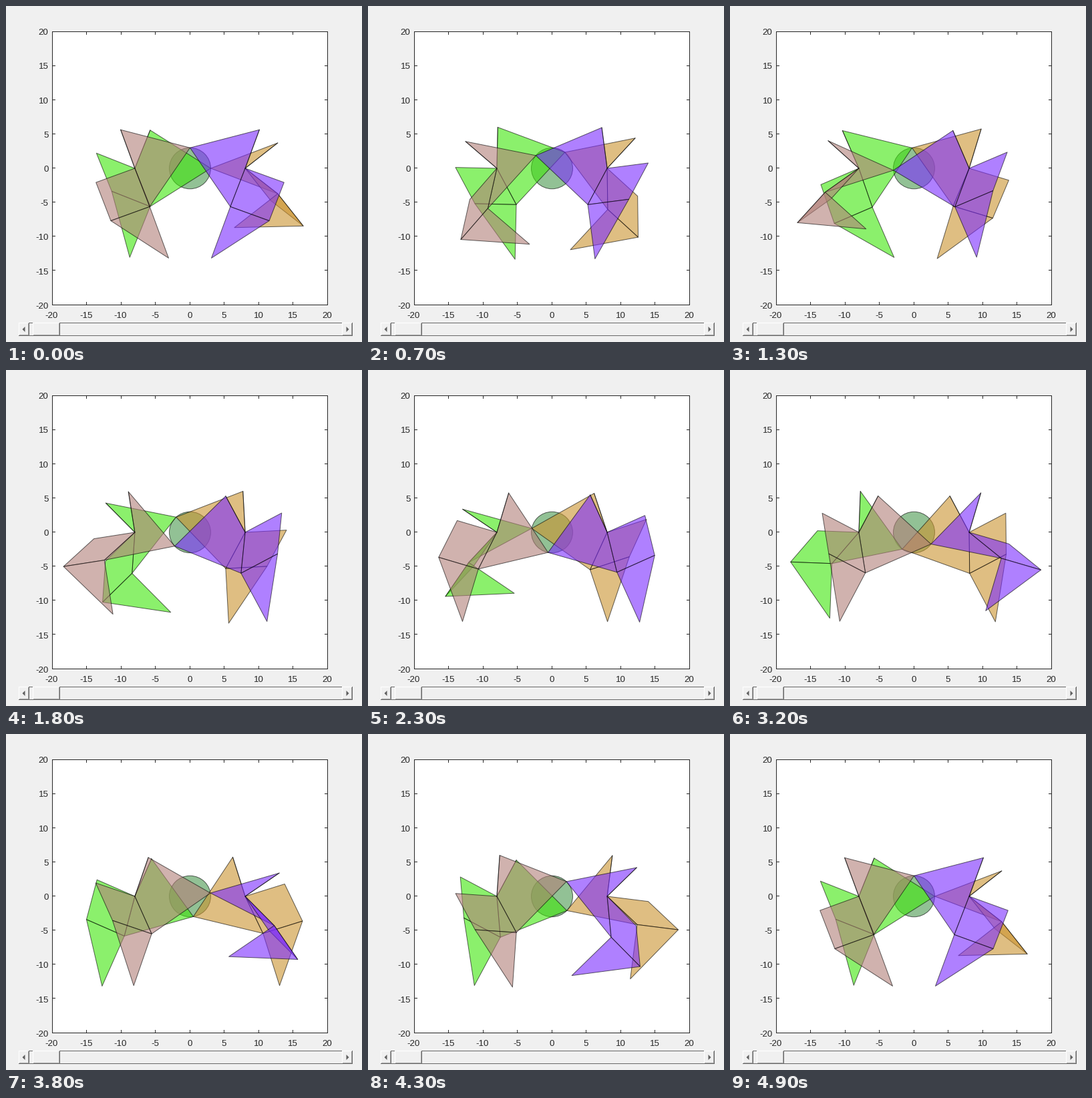
Animation of 533 by 503 pixels, one loop 5 s. Source, as a matplotlib script:

```python
import numpy as np
import matplotlib.pyplot as plt
from matplotlib.animation import FuncAnimation
from matplotlib.patches import Circle, Polygon, Rectangle

W, H, DPI = 533, 503, 100
PX = 72 / DPI                      # one pixel in points
FRAMES, INTERVAL = 50, 100
CRANK, PIVOT, BAR, ROD, SHIN = 3, 8, 6, 10.4, 8
ALPHA = 0.6
INK = "#262626"
LINE = (0, 0, 0, ALPHA)
EDGE = dict(edgecolor=LINE, linewidth=PX, joinstyle="round", zorder=1)
LEFT, RIGHT, TOP, BOTTOM = 69, 482, 38, 448

plt.rcParams["font.family"] = "Liberation Sans"
fig = plt.figure(figsize=(W / DPI, H / DPI), dpi=DPI, facecolor="#f0f0f0")

# Pixel-space layer for the frame, the labels and the scroll bar
ui = fig.add_axes([0, 0, 1, 1], zorder=-1)
ui.set(xlim=(0, W), ylim=(H, 0))
ui.axis("off")

ax = fig.add_axes([LEFT / W, 1 - BOTTOM / H, (RIGHT - LEFT) / W, (BOTTOM - TOP) / H])
ax.set(xlim=(-20, 20), ylim=(-20, 20))
ax.axis("off")


def box(x0, y0, x1, y1, color):
    ui.add_patch(Rectangle((x0, y0), x1 - x0, y1 - y0, color=color,
                           linewidth=0, antialiased=False))


def label(x, y, value, align):
    ui.text(x, y, str(value), ha=align, va="baseline", color=INK, fontsize=13.33 * PX)


def raised(x0, y0, x1, y1):
    box(x0, y0, x1, y1, "#696969")
    box(x0, y0, x1 - 1, y1 - 1, "#ffffff")
    box(x0 + 1, y0 + 1, x1 - 1, y1 - 1, "#a0a0a0")
    box(x0 + 1, y0 + 1, x1 - 2, y1 - 2, "#f0f0f0")


def arrow(x, y, direction):
    ui.add_patch(Polygon([(x - 2 * direction, y - 4), (x - 2 * direction, y + 4),
                          (x + 2 * direction, y)], color="#606060", linewidth=0))


# Plot frame with inward ticks on all four sides
box(LEFT, TOP, RIGHT, BOTTOM, INK)
box(LEFT + 1, TOP + 1, RIGHT - 1, BOTTOM - 1, "white")
for v in range(-20, 21, 5):
    share = (v + 20) / 40
    x = int(LEFT + share * (RIGHT - LEFT - 1))
    y = int(BOTTOM - 1 - share * (BOTTOM - TOP - 1))
    box(x, TOP, x + 1, TOP + 5, INK)
    box(x, BOTTOM - 5, x + 1, BOTTOM, INK)
    box(LEFT, y, LEFT + 5, y + 1, INK)
    box(RIGHT - 5, y, RIGHT, y + 1, INK)
    label(LEFT - 0.8 + share * (RIGHT - LEFT), 467, v, "center")
    label(63.5, BOTTOM + 5 - share * (BOTTOM - TOP), v, "right")

# Scroll bar
box(35, 474, 504, 494, "#696969")
box(35, 475, 503, 493, "#f0f0f0")
raised(19, 474, 35, 494)
raised(503, 474, 519, 494)
raised(40, 474, 81, 494)
arrow(26.5, 484, -1)
arrow(511.5, 484, 1)


def tint(rgb):
    return tuple(c / 255 for c in rgb) + (ALPHA,)


class Leg:
    """Linkage on one side: side is -1 for left and 1 for right."""

    def __init__(self, side, phase, rgb):
        self.side, self.phase = side, phase
        self.parts = [ax.add_patch(Polygon(np.zeros((n, 2)), facecolor=tint(rgb), **EDGE))
                      for n in (4, 4, 3)]
        self.bar, = ax.plot([], [], color=LINE, linewidth=PX, zorder=1)

    def points(self, *zs):
        z = np.array(zs)
        return np.column_stack([-self.side * z.real, z.imag])

    def pose(self, theta):
        # Solved as a left leg, then mirrored for the right side
        angle = theta + self.phase
        hip = complex(-PIVOT, 0)
        crank = complex(-self.side * CRANK * np.cos(angle), CRANK * np.sin(angle))
        reach = crank - hip
        dist = abs(reach)
        spread = np.arccos((dist**2 + BAR**2 - ROD**2) / (2 * BAR * dist))
        arm = BAR * reach / dist * np.exp(1j * spread)
        knee = hip + BAR * reach / dist * np.exp(-1j * spread)
        heel = knee + 1j * arm
        foot = knee - arm * SHIN / BAR
        upper, middle, lower = self.parts
        upper.set_xy(self.points(crank, hip + arm, hip, knee))
        middle.set_xy(self.points(hip, hip + 1j * arm, heel, knee))
        lower.set_xy(self.points(knee, heel, foot))
        self.bar.set_data(*self.points(hip, hip + arm).T)


ax.add_patch(Circle((0, 0), CRANK, facecolor=tint((73, 152, 78)), **EDGE))
legs = [Leg(-1, 0, (62, 230, 10)),
        Leg(1, 0, (203, 147, 47)),
        Leg(-1, np.pi / 2, (178, 127, 120)),
        Leg(1, np.pi / 2, (123, 43, 255))]
ax.set(xlim=(-20, 20), ylim=(-20, 20))


def update(i):
    for leg in legs:
        leg.pose(2 * np.pi * i / (FRAMES - 1))


anim = FuncAnimation(fig, update, frames=FRAMES, interval=INTERVAL,
                     repeat=True, repeat_delay=0, cache_frame_data=False)
plt.show()
```
